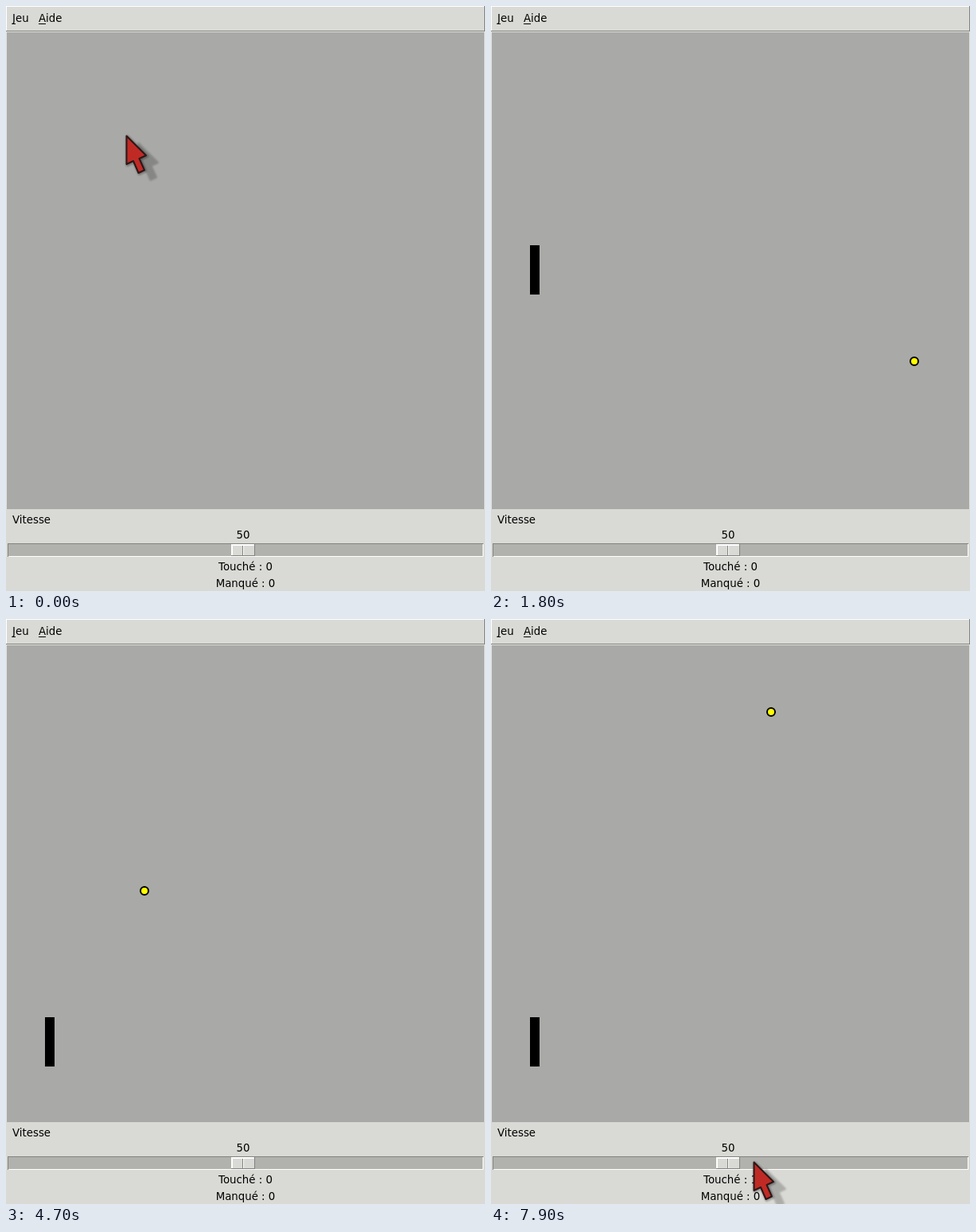
Animation, 602 px wide and 736 px high, one loop 8 s. Source, as an HTML page:

```html
<!DOCTYPE html>
<html lang="fr">
<head>
<meta charset="utf-8">
<title>Jeu de balle</title>
<style>
  html, body { margin: 0; width: 100%; height: 100%; overflow: hidden; background: #d9d9d5; }
  svg { display: block; }
  text { font: 13.33px "DejaVu Sans", sans-serif; fill: #000; }
  .mid { text-anchor: middle; }
  .light { fill: #fff; }
  .dark { fill: #828280; }
  .face { fill: #d9d9d5; }
  .active { fill: #ececec; }
</style>
</head>
<body>
<svg width="602" height="736" viewBox="0 0 602 736">
  <defs>
    <path id="arrow" d="M3.5 2.5V38L12 34L18.5 49L26 45.5L19.5 31L28 27Z" stroke-linejoin="round"/>
    <filter id="soft" x="-30%" y="-30%" width="160%" height="160%"><feGaussianBlur stdDeviation="1.1"/></filter>
  </defs>
  <rect class="face" width="602" height="736"/>

  <g shape-rendering="crispEdges">
    <path class="light" d="M0 0H602V1H1V31H0Z"/>
    <path class="dark" d="M601 0H602V32H0V31H601Z"/>
    <rect id="menu" class="face" x="1" y="1" width="33" height="30"/>
    <rect x="8" y="22" width="4" height="1"/>
    <rect x="41" y="22" width="9" height="1"/>

    <rect x="0" y="32" width="602" height="601" fill="#e2e2df"/>
    <rect x="1" y="33" width="600" height="600" fill="#a9a9a7"/>

    <rect class="light" x="2" y="676" width="598" height="17"/>
    <path class="dark" d="M2 676H600V677H3V693H2Z"/>
    <rect x="3" y="677" width="596" height="15" fill="#b1b1ae"/>
    <rect class="dark" x="283" y="677" width="30" height="15"/>
    <rect class="light" x="283" y="677" width="29" height="14"/>
    <rect id="knob" class="face" x="285" y="679" width="27" height="12"/>
    <rect class="dark" x="297" y="679" width="1" height="12"/>
    <rect class="light" x="298" y="679" width="1" height="12"/>
  </g>

  <text x="8" y="20">Jeu</text>
  <text x="41" y="20">Aide</text>
  <text x="8" y="651">Vitesse</text>
  <text class="mid" x="298" y="670">50</text>
  <text id="hits" class="mid" x="301" y="710">Touché : 0</text>
  <text class="mid" x="301" y="731">Manqué : 0</text>

  <g id="game">
    <rect id="paddle" x="49" width="12" height="62" shape-rendering="crispEdges"/>
    <circle id="ball" r="5" fill="#ff0" stroke="#000" stroke-width="2"/>
  </g>

  <g id="cursor">
    <use href="#arrow" x="15" y="9" opacity=".2" stroke="#000" stroke-width="2" filter="url(#soft)"/>
    <use href="#arrow" x="1" y="1" opacity=".3" fill="none" stroke="#000" stroke-width="4" filter="url(#soft)"/>
    <use href="#arrow" fill="#c02a25" stroke="#2b1716" stroke-width="2"/>
  </g>
</svg>
<script>
const LOOP = 8000, FRAME = 100, START = 1400, POINTER_BACK = 6700;
const HIT_STEP = 206;
const $ = id => document.getElementById(id);

// Each track lists [time, ...values].
const pointer = [[0, 148, 161], [100, 139, 152], [400, 44, 50], [500, 24, 28], [700, 16, 17],
  [800, 16, 17], [1000, 24, 45], [START, 24, 45], [POINTER_BACK, 400, 586],
  [7200, 92, 677], [7600, 285, 680], [7900, 327, 681]];
const ballSteps = [[START, 0], [1800, 19], [3000, 79], [3100, 83], [4000, 129], [4700, 162],
  [4900, 172], [6200, 238], [6700, 262], [7600, 307], [7900, 321]];
const paddleTop = [[2250, 301], [2300, 291], [2500, 291], [3030, 121], [3200, 121],
  [3250, 131], [3450, 131], [4000, 311], [4630, 501]];

function sample(track, t) {
  const i = track.findIndex(knot => knot[0] >= t);
  if (i === 0) return track[0].slice(1);
  if (i < 0) return track[track.length - 1].slice(1);
  const a = track[i - 1], b = track[i];
  const k = (t - a[0]) / (b[0] - a[0]);
  return a.slice(1).map((v, j) => v + (b[j + 1] - v) * k);
}

function bounce(v, low, high) {
  const span = high - low, period = 2 * span;
  const p = ((v - low) % period + period) % period;
  return low + (p < span ? p : period - p);
}

function draw(now) {
  const t = Math.floor(now % LOOP / FRAME) * FRAME;
  const playing = t >= START;

  $("game").style.display = playing ? "" : "none";
  const step = Math.round(sample(ballSteps, t)[0]);
  $("ball").setAttribute("cx", Math.floor(64.5 + 2.5 * Math.abs(step - HIT_STEP)));
  $("ball").setAttribute("cy", bounce(542 - 5 * step, 37, 627));
  $("paddle").setAttribute("y", Math.round((sample(paddleTop, t)[0] - 1) / 10) * 10 + 1);
  $("hits").textContent = "Touché : " + (step >= HIT_STEP ? 1 : 0);

  const shown = !playing || t >= POINTER_BACK;
  const [x, y] = sample(pointer, t).map(Math.round);
  $("cursor").style.display = shown ? "" : "none";
  $("cursor").setAttribute("transform", `translate(${x} ${y})`);

  const onKnob = shown && x + 3 >= 283 && x + 3 < 313 && y + 3 >= 677 && y + 3 < 692;
  $("knob").setAttribute("class", onKnob ? "active" : "face");
  $("menu").setAttribute("class", t >= 600 && !playing ? "active" : "face");
}

const origin = performance.now();
function tick() {
  draw(performance.now() - origin);
  requestAnimationFrame(tick);
}
tick();
</script>
</body>
</html>
```
